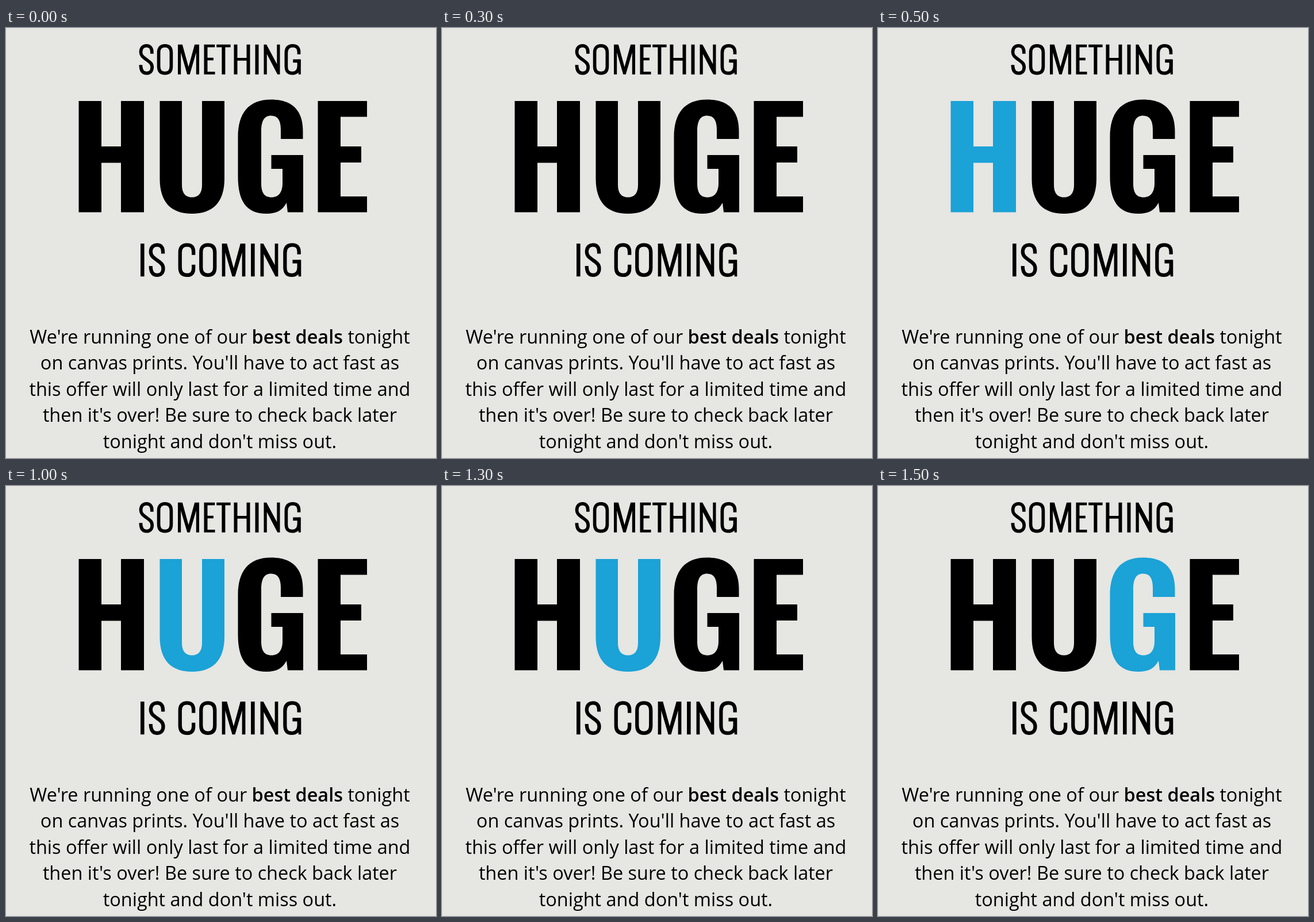
Write an HTML page that moves like this. It is 748x748 px and loops after 2 s.

```html
<!DOCTYPE html>
<html lang="en">
<head>
<meta charset="utf-8">
<title>Something huge is coming</title>
<style>
  html, body { margin: 0; width: 100%; height: 100%; overflow: hidden; background: #e6e6e2; }
  svg { display: block; width: 100%; height: 100%; }

  .round { fill: none; stroke: #000; stroke-width: 5.7; }

  .copy { font: 400 32.45px "Open Sans", "Noto Sans", sans-serif; text-anchor: middle; }
  .copy .strong { font-weight: 600; }

  .flash { animation: flash 2s step-end infinite; }
  .h { animation-delay: -1.5s; }
  .u { animation-delay: -1s; }
  .g { animation-delay: -.5s; }
  @keyframes flash {
    0% { fill: #1ba2d7; }
    25%, 100% { fill: #000; }
  }
</style>
</head>
<body>
<svg viewBox="0 0 748 748">
  <defs>
    <!-- condensed capitals, 52 units tall -->
    <path id="S" class="round" d="M22.3 16V13C22.3 6 19 2.1 13 2.1C6.5 2.1 3 6.5 3 13C3 20 8 22.5 13 26.3C18.5 30.3 22.7 32.8 22.7 39.5C22.7 46 19 49.9 13 49.9C6 49.9 2.9 45 2.9 35.5"/>
    <path id="O" class="round" d="M2.9 14C2.9 6 6.5 2.1 13.8 2.1S24.7 6 24.7 14V38C24.7 46 21 49.9 13.8 49.9S2.9 46 2.9 38Z"/>
    <path id="C" class="round" d="M24.2 18V13C24.2 6 21 2.1 14 2.1C6.5 2.1 2.9 6.4 2.9 14V38C2.9 46 6.5 49.9 14 49.9C21 49.9 24.2 46 24.2 39V33.5"/>
    <g id="G">
      <path class="round" d="M25 17V13C25 6 21.5 2.1 14.4 2.1C6.5 2.1 2.9 6.4 2.9 14.5V37.5C2.9 46 6 49.9 13.3 49.9C21 49.9 25 45 25 37V28.6H14.8"/>
      <path d="M23.5 26H28.3V52H24.3L23.5 44Z"/>
    </g>
    <path id="M" d="M0 52V0H7.8L18.5 39L29.2 0H37V52H31.8V14L20.7 52H16.3L5.2 14V52Z"/>
    <path id="E" d="M0 0H18.8V4.7H6V23H16.4V27.5H6V47.3H19V52H0Z"/>
    <path id="T" d="M0 0H24.4V4.7H15.2V52H9.2V4.7H0Z"/>
    <path id="H" d="M0 0H6V23.3H22V0H28V52H22V28H6V52H0Z"/>
    <path id="I" d="M0 0H6V52H0Z"/>
    <path id="N" d="M0 0H4.6L22.8 34V0H28V52H23.8L5.3 16.5V52H0Z"/>
  </defs>

  <rect width="748" height="748" fill="#e6e6e2"/>

  <g role="img" aria-label="SOMETHING" transform="translate(231.5 28.8)">
    <use href="#S"/>
    <use href="#O" x="31.2"/>
    <use href="#M" x="67.5"/>
    <use href="#E" x="113"/>
    <use href="#T" x="134.7"/>
    <use href="#H" x="165"/>
    <use href="#I" x="202"/>
    <use href="#N" x="217"/>
    <use href="#G" x="253"/>
  </g>

  <g role="img" aria-label="HUGE">
    <path class="flash h" d="M126.5 127H166V206H200V127H240V320.5H200V234.5H166V320.5H126.5Z"/>
    <path class="flash u" d="M267.5 127H306V273C306 287 312 294.5 323.5 294.5S341 287 341 273V127H380V262C380 303 360 323 323.5 323S267.5 303 267.5 262Z"/>
    <path class="flash g" d="M517 221H461.5V245H481V270C481 286 474 294.5 462 294.5C449 294.5 444 286 444 270V180C444 162 449 152.5 461 152.5C473 152.5 478 161 478 177V193H516.5V180C516.5 143 498 124.5 461 124.5C422 124.5 403.5 148 403.5 190V258C403.5 301 418 323 453 323C471 323 481 317 488 304L490 320.5H517Z"/>
    <path d="M542.5 127H628V154.5H582V206H618V234H582V293H628V320.5H542.5Z"/>
  </g>

  <g role="img" aria-label="IS COMING" transform="translate(234 375) scale(1.1)">
    <use href="#I"/>
    <use href="#S" x="13.2"/>
    <use href="#C" x="59.6"/>
    <use href="#O" x="92.8"/>
    <use href="#M" x="128.8"/>
    <use href="#I" x="174.6"/>
    <use href="#N" x="189.6"/>
    <use href="#G" x="225.6"/>
  </g>

  <g class="copy">
    <text x="372" y="549">We're running one of our <tspan class="strong">best deals</tspan> tonight</text>
    <text x="372" y="594.4">on canvas prints. You'll have to act fast as</text>
    <text x="372" y="639.8">this offer will only last for a limited time and</text>
    <text x="372" y="685.2">then it's over! Be sure to check back later</text>
    <text x="372" y="730.6">tonight and don't miss out.</text>
  </g>
</svg>
</body>
</html>
```
